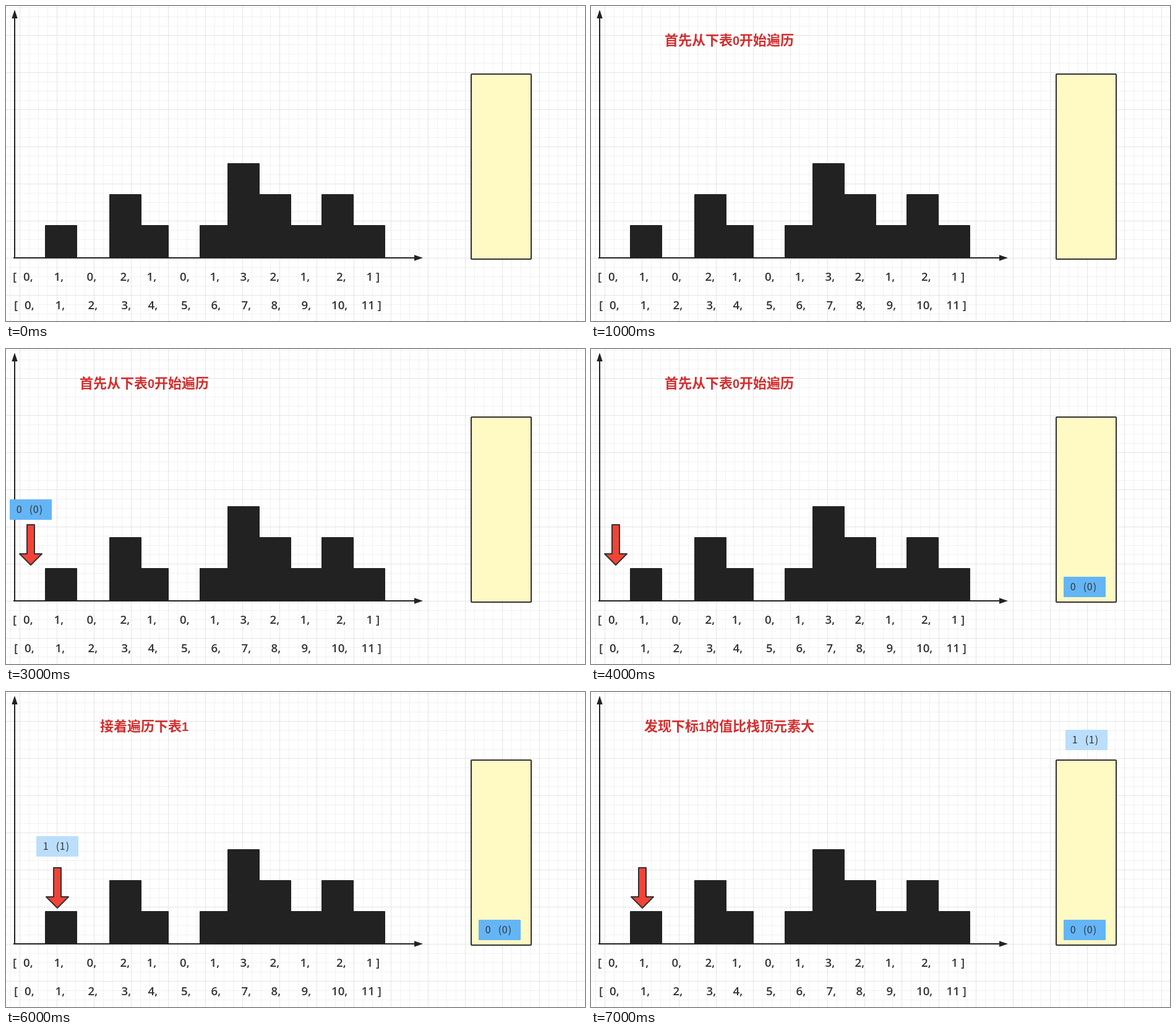
An HTML page for the animation above (8000 ms loop, 936 px wide and 509 px high).

```html
<!DOCTYPE html>
<html lang="zh-CN">
<head>
<meta charset="utf-8">
<title>单调栈</title>
<style>
html, body { margin: 0; width: 100%; height: 100%; overflow: hidden; background: #fff; }
svg { display: block; width: 936px; height: 509px; }
.nums { font: 600 18.67px "Open Sans", "Noto Sans", sans-serif; fill: #323232; }
.title { font: 700 22px "Noto Sans CJK SC", "Noto Sans CJK", sans-serif; fill: #d32f2f; text-anchor: middle; }
.title tspan { font: 700 20px "Liberation Sans", sans-serif; }
.tag text { font: 500 16px "Noto Sans CJK SC", "Noto Sans CJK", sans-serif; fill: #323232; text-anchor: middle; }
.step { visibility: hidden; animation: 8s step-end infinite; }
#start { animation-name: start; }
#next { animation-name: next; }
#compare { animation-name: compare; }
#arrow { animation-name: arrow; }
#tag0 { animation-name: tag0; }
#tag1 { animation-name: tag1; }
@keyframes start { 0%, 62.5% { visibility: hidden } 12.5% { visibility: visible } }
@keyframes next { 0%, 87.5% { visibility: hidden } 62.5% { visibility: visible } }
@keyframes compare { 0% { visibility: hidden } 87.5%, 100% { visibility: visible } }
@keyframes arrow {
  0% { visibility: hidden; transform: none }
  25% { visibility: visible; transform: none }
  75%, 100% { visibility: visible; transform: translate(43px, 0) }
}
@keyframes tag0 {
  0% { visibility: hidden; transform: translate(6px, 243px) }
  37.5% { visibility: visible; transform: translate(6px, 243px) }
  50%, 100% { visibility: visible; transform: translate(764px, 368px) }
}
@keyframes tag1 {
  0% { visibility: hidden; transform: translate(49px, 233px) }
  75% { visibility: visible; transform: translate(49px, 233px) }
  87.5%, 100% { visibility: visible; transform: translate(767px, 61px) }
}
</style>
</head>
<body>
<svg viewBox="0 0 936 509">
  <defs>
    <pattern id="grid" x="22" y="47" width="60" height="60" patternUnits="userSpaceOnUse">
      <path d="M15.5 0V60M30.5 0V60M45.5 0V60M0 15.5H60M0 30.5H60M0 45.5H60" stroke="#f2f2f2"/>
      <path d="M.5 0V60M0 .5H60" stroke="#e5e5e5"/>
    </pattern>
  </defs>
  <rect width="936" height="509" fill="url(#grid)"/>

  <g id="bars" fill="#222"></g>
  <path d="M14 18V407M12 407H662" stroke="#222" stroke-width="2"/>
  <path d="M14 6L18.7 20H9.3ZM674 407L660 411.7V402.3Z" fill="#222"/>
  <rect x="752" y="110" width="97" height="299" rx="1" fill="#fff9c4" stroke="#323232" stroke-width="2"/>
  <g id="nums" class="nums"></g>

  <text id="start" class="title step" x="223.5" y="63">首先从下表<tspan>0</tspan>开始遍历</text>
  <text id="next" class="title step" x="223.5" y="63">接着遍历下表<tspan>1</tspan></text>
  <text id="compare" class="title step" x="223.5" y="63">发现下标<tspan>1</tspan>的值比栈顶元素大</text>

  <path id="arrow" class="step" d="M34 284H46V331H58L40 349L22 331H34Z" fill="#f44336" stroke="#323232" stroke-width="2" stroke-linejoin="round"/>

  <g id="tag0" class="tag step">
    <rect width="68" height="33" rx="1" fill="#64b5f6"/>
    <text y="22"><tspan x="15.3">0</tspan><tspan x="34.5">(</tspan><tspan x="42.3">0</tspan><tspan x="50.5">)</tspan></text>
  </g>
  <g id="tag1" class="tag step">
    <rect width="68" height="33" rx="1" fill="#bbdefb"/>
    <text y="22"><tspan x="15.3">1</tspan><tspan x="34.5">(</tspan><tspan x="42.3">1</tspan><tspan x="50.5">)</tspan></text>
  </g>
</svg>
<script>
function add(parent, name, attrs, text = "") {
  const el = document.createElementNS("http://www.w3.org/2000/svg", name);
  for (const key in attrs) el.setAttribute(key, attrs[key]);
  el.textContent = text;
  document.getElementById(parent).append(el);
}

// left, right, height in units
const bars = [
  [63, 115, 1], [167, 219, 2], [218, 263, 1], [313, 359, 1], [358, 410, 3],
  [409, 461, 2], [460, 511, 1], [510, 562, 2], [561, 613, 1]
];
for (const [left, right, n] of bars) {
  const y = 404 - n * 50;
  add("bars", "rect", { x: left, y, width: right - left, height: 407 - y, rx: 1 });
}

const cols = [28, 77.5, 130.5, 184.5, 227.5, 281, 329.5, 378.5, 426.5, 475.5, 534, 582.5];
const heights = [0, 1, 0, 2, 1, 0, 1, 3, 2, 1, 2, 1];
add("nums", "text", { x: 11, y: 444 }, "[");
add("nums", "text", { x: 13, y: 490 }, "[");
cols.forEach((x, i) => {
  const end = i < 11 ? "," : " ]";
  const shift = i < 10 ? 2 : -8;
  add("nums", "text", { x, y: 444 }, heights[i] + end);
  add("nums", "text", { x: x + shift, y: 490 }, i + end);
});
</script>
</body>
</html>
```
